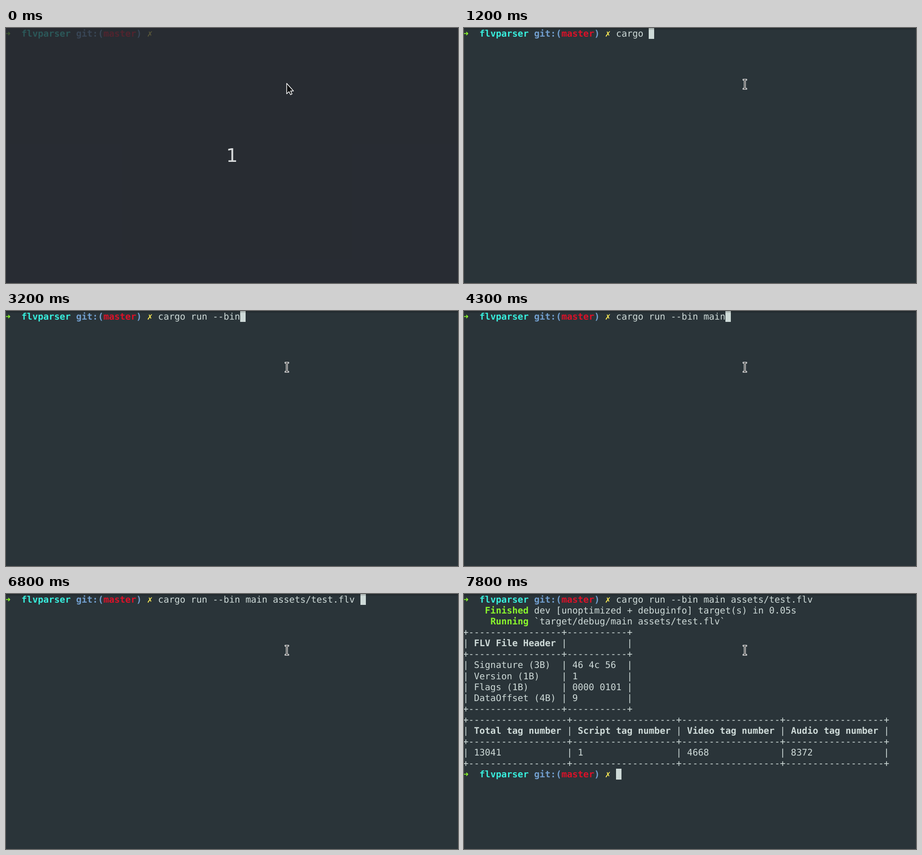
These frames come from a looping animation (996x562 px, 8 s). An HTML page:

```html
<!DOCTYPE html>
<html lang="en">
<head>
<meta charset="utf-8">
<title>Terminal session</title>
<style>
  html, body { margin: 0; width: 100%; height: 100%; overflow: hidden; background: #2a3439; }
  #stage { position: relative; width: 996px; height: 562px; overflow: hidden; background: #2a3439; }
  #stage > * { position: absolute; }
  pre {
    left: -2.1px; top: 0; margin: 0; color: #cedad8;
    font: 20px/24.08px "DejaVu Sans Mono", monospace;
    text-rendering: geometricPrecision; font-variant-ligatures: none;
  }
  .green { color: #8af52d; }
  .cyan { color: #38eedd; }
  .blue { color: #729fcf; }
  .red { color: #dc1128; }
  .yellow { color: #fcec55; }
  #caret { left: 0; top: 0; width: 12px; height: 24px; background: #cedad8; }
  #shade { inset: 0 0 auto; height: 5px; background: linear-gradient(#0004, #0000); }
  #dim { inset: 0; background: rgba(39, 42, 49, .77); }
  #count {
    inset: 0; text-align: center; color: #d9dcdd;
    font: 40px/562px "DejaVu Sans", sans-serif;
  }
  svg { left: 0; top: 0; }
</style>
</head>
<body>
<div id="stage">
  <div id="caret"></div>
  <pre id="screen"></pre>
  <div id="shade"></div>
  <div id="dim"></div>
  <div id="count">1</div>
  <svg width="996" height="562" stroke="#fff" stroke-linejoin="round">
    <path id="arrow" fill="#0b0d0e" stroke-width="1.5"
      d="M618.5 122V145L623.6 140.3L627 147L630.3 145.4L627.2 138.8H633.5Z"/>
    <path id="beam" fill="#111" stroke-width="1.3"
      d="M614.8 112.8H623V115.2H620.3V132.8H623V135.2H614.8V132.8H617.5V115.2H614.8Z"/>
  </svg>
</div>
<script>
const LOOP = 8000, CELL_W = 12.041, CELL_H = 24.08, LEFT = -2.1, PROMPT = 28;
const command = 'cargo run --bin main assets/test.flv ';

// [time, characters typed]
const keys = [
  [0, 0], [600, 1], [700, 2], [900, 3], [1100, 4], [1200, 6], [1500, 7], [1600, 8],
  [1700, 10], [2800, 11], [2900, 12], [3000, 13], [3200, 15], [3400, 16], [4000, 17],
  [4100, 18], [4300, 20], [4500, 21], [4800, 22], [5000, 23], [5200, 24], [5400, 28],
  [5700, 30], [5900, 32], [6500, 33], [6800, 37]
];
const caretOff = [[0, 500], [2300, 2800], [7400, 7600]];

const el = id => document.getElementById(id);
const paint = (color, text) => `<b class="${color}">${text}</b>`;
const bold = text => `<b>${text}</b>`;
const rule = widths => '+' + widths.map(w => '-'.repeat(w) + '+').join('');
const row = (widths, cells, style = s => s) =>
  '|' + cells.map((c, i) => style((' ' + c).padEnd(widths[i])) + '|').join('');

function table(widths, head, rows) {
  const line = rule(widths);
  return [line, row(widths, head, bold), line, ...rows.map(r => row(widths, r)), line];
}

const prompt = paint('green', '➜') + '  ' + paint('cyan', 'flvparser') + ' ' +
  paint('blue', 'git:(') + paint('red', 'master') + paint('blue', ')') + ' ' +
  paint('yellow', '✗') + ' ';

const output = [
  '    ' + paint('green', 'Finished') + ' dev [unoptimized + debuginfo] target(s) in 0.05s',
  '     ' + paint('green', 'Running') + ' `target/debug/main assets/test.flv`',
  ...table([17, 11], ['FLV File Header', ''], [
    ['Signature (3B)', '46 4c 56'],
    ['Version (1B)', '1'],
    ['Flags (1B)', '0000 0101'],
    ['DataOffset (4B)', '9']
  ]),
  ...table([18, 19, 18, 18],
    ['Total tag number', 'Script tag number', 'Video tag number', 'Audio tag number'],
    [['13041', '1', '4668', '8372']])
];

let shown = '';
function draw(t) {
  const typed = keys.findLast(k => k[0] <= t)[1];
  let text = command.slice(0, typed);
  // A completed directory keeps a bold slash until the next key
  if (typed === 28) text = text.slice(0, -1) + bold('/');

  const lines = [prompt + text];
  let col = PROMPT + typed, line = 0;
  if (t >= 7600) { col = 0; line = 1; }
  if (t >= 7700) { lines.push(...output); line = lines.length; }
  if (t >= 7800) { lines.push(prompt); col = PROMPT; }

  const html = lines.join('\n');
  if (html !== shown) el('screen').innerHTML = shown = html;

  const x = Math.round(LEFT + col * CELL_W), y = Math.round(line * CELL_H);
  el('caret').style.transform = `translate(${x}px, ${y}px)`;
  const off = caretOff.some(([a, b]) => t >= a && t < b);
  el('caret').style.visibility = off ? 'hidden' : 'visible';

  const intro = t < 500;
  for (const id of ['dim', 'count', 'arrow']) el(id).style.display = intro ? '' : 'none';
  el('beam').style.display = intro ? 'none' : '';
}

const start = performance.now();
function tick() {
  draw((performance.now() - start) % LOOP);
  requestAnimationFrame(tick);
}
draw(0);
requestAnimationFrame(tick);
</script>
</body>
</html>
```
